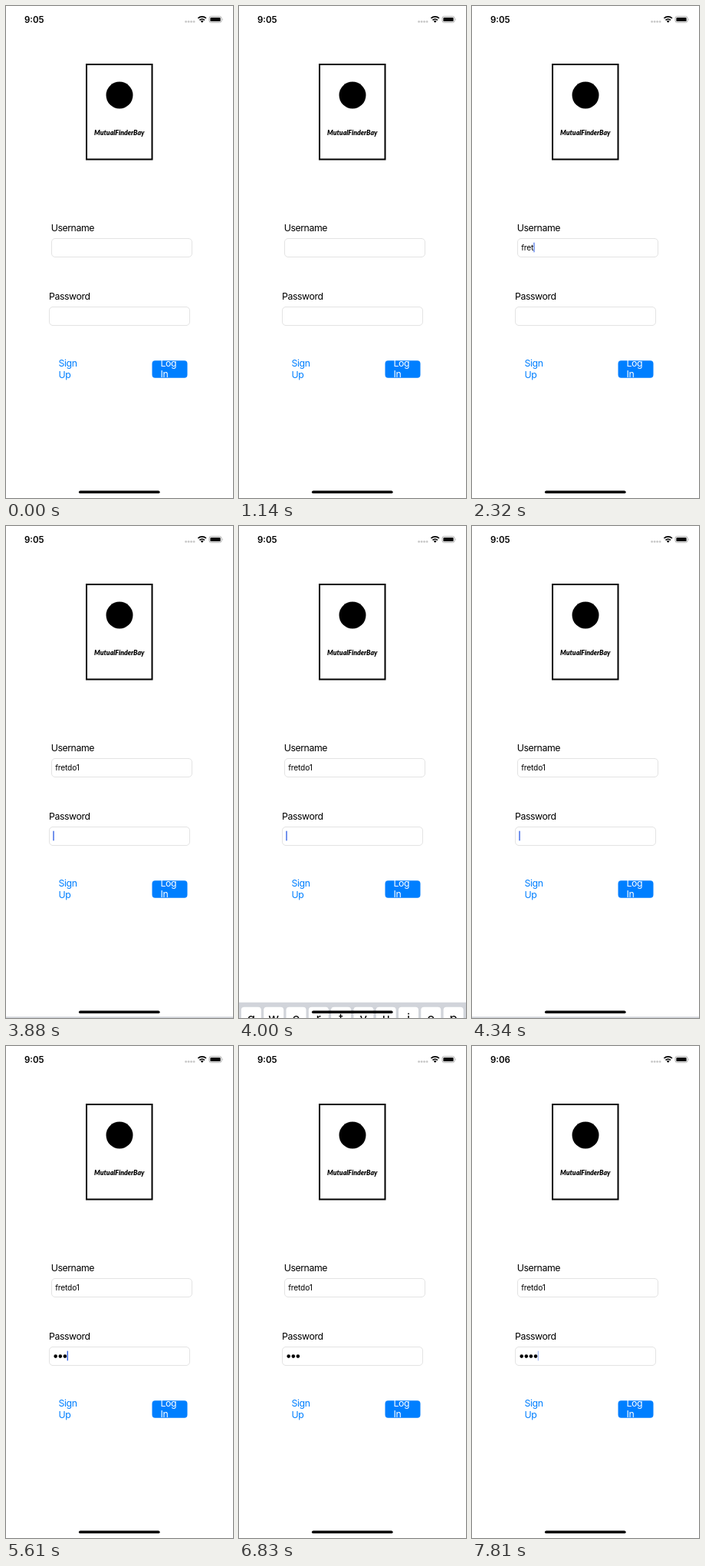
An HTML page that plays this animation: 296 by 640 pixels, repeating every 8000 ms.

```html
<!DOCTYPE html>
<html lang="en">
<head>
<meta charset="utf-8">
<title>Log in</title>
<style>
  html, body { margin: 0; width: 100%; height: 100%; overflow: hidden; background: #fff; }
  svg { display: block; width: 296px; height: 640px; font-family: Inter, Roboto, sans-serif; }
  .label { font-size: 12.3px; letter-spacing: -.43px; }
  .entry { font-size: 10.2px; letter-spacing: -.2px; }
  .clock { font-size: 11.5px; font-weight: 600; }
  .brand { font: italic 900 8.7px Lato, sans-serif; text-anchor: middle; }
  .field { fill: #fff; stroke: #e3e3e3; }
  .key { font-size: 17px; text-anchor: middle; }
  .blue { fill: #007fff; }
</style>
</head>
<body>
<svg viewBox="0 0 296 640">
  <rect width="296" height="640" fill="#fff"/>

  <text id="clock" class="clock" x="24" y="21.8">9:05</text>
  <g id="signal" fill="#c9c9c9"></g>
  <g fill="none" stroke="#000" stroke-width="1.7">
    <path d="M250.4 16a7.6 7.6 0 0 1 10.6 0"/>
    <path d="M252.5 18.3a4.6 4.6 0 0 1 6.4 0"/>
  </g>
  <path d="M255.7 21.8l-1.9-2a2.7 2.7 0 0 1 3.8 0z"/>
  <rect x="265" y="13.5" width="16" height="8" rx="2.4" fill="none" stroke="#a8a8a8" stroke-width=".9"/>
  <rect x="266.4" y="14.9" width="13.2" height="5.2" rx="1.2"/>
  <path d="M282.4 16.1q1.3 1.4 0 2.8z" fill="#a8a8a8"/>

  <rect x="105" y="76" width="85.5" height="123.5" fill="#fff" stroke="#000" stroke-width="2"/>
  <circle cx="148" cy="116" r="17.5"/>
  <text class="brand" x="147.8" y="167.5">MutualFinderBay</text>

  <text class="label" x="58.7" y="293.2">Username</text>
  <rect class="field" x="59.5" y="302.5" width="183" height="24" rx="4.5"/>
  <text id="user" class="entry" x="64.3" y="318"></text>

  <text class="label" x="56.1" y="382.4">Password</text>
  <rect class="field" x="56.5" y="391.5" width="183" height="24" rx="4.5"/>
  <g id="dots"></g>

  <rect id="caret" width="1.4" height="12.6" fill="#3a66e6"/>

  <text class="label blue" x="68.6" y="469.3">Sign</text>
  <text class="label blue" x="68.6" y="483.7">Up</text>
  <rect class="blue" x="190.5" y="461.3" width="46" height="22.4" rx="4"/>
  <g class="label" fill="#fff">
    <text x="201.6" y="469.3">Log</text>
    <text x="201.6" y="483.4">In</text>
  </g>

  <g id="keyboard"></g>
  <rect x="95" y="630.4" width="105.6" height="3.7" rx="1.85"/>
</svg>
<script>
  const LOOP = 8000, SWITCH = 3880, STEP = 115;
  const $ = id => document.getElementById(id);

  // [start time, value]: each value holds until the next start
  const typed = [[0, ''], [1450, 'f'], [1700, 'fre'], [1810, 'fret'], [2680, 'fretdo'], [3060, 'fretdo1']];
  const dotCount = [[0, 0], [4960, 1], [5270, 2], [5610, 3], [7300, 4]];
  const caretAlpha = [
    [0, 0], [500, 1], [1140, 0], [1450, 1], [2320, .8], [2440, 0], [2680, 1], [3690, 0],
    [3880, 1], [4455, .5], [4570, 0], [4850, .6], [4960, 1],
    [6230, 0], [6470, .5], [6590, 1], [6830, 0], [7300, 1], [7690, .75], [7810, .4]
  ];
  const clockText = [[0, '9:05'], [7410, '9:06']];

  const at = (track, t) => track.filter(([start]) => start <= t).pop()[1];

  function add(parent, tag, attrs, text = '') {
    const node = document.createElementNS('http://www.w3.org/2000/svg', tag);
    for (const name in attrs) node.setAttribute(name, attrs[name]);
    node.textContent = text;
    parent.append(node);
    return node;
  }

  for (let i = 0; i < 4; i++) add($('signal'), 'circle', { cx: 234.6 + i * 3.5, cy: 20.4, r: 1.4 });

  const dots = [0, 1, 2, 3].map(i =>
    add($('dots'), 'circle', { cx: 64.7 + i * 6.1, cy: 403.6, r: 2.3 }));

  add($('keyboard'), 'rect', { width: 296, height: 60, fill: '#d1d4da' });
  [...'qwertyuiop'].forEach((letter, i) => {
    const x = 15.9 + i * 29.3;
    add($('keyboard'), 'rect', { x: x - 13, y: 6, width: 26, height: 32, rx: 3.8, fill: '#fff' });
    add($('keyboard'), 'text', { x, y: 27, class: 'key' }, letter);
  });

  // The keyboard peeks up 33px and drops again, in coarse steps
  function keyboardRise(t) {
    const stepped = SWITCH + Math.floor((t - SWITCH) / STEP) * STEP;
    const phase = (stepped - SWITCH - 2 * STEP) / 270;
    return t < SWITCH || Math.abs(phase) >= 1 ? 0 : 33 * Math.cos(phase * Math.PI / 2) ** 2;
  }

  function draw(t) {
    const user = $('user'), caret = $('caret');
    const count = at(dotCount, t);
    const inUser = t < SWITCH;

    user.textContent = at(typed, t);
    $('clock').textContent = at(clockText, t);
    dots.forEach((dot, i) => dot.setAttribute('opacity', i < count ? 1 : 0));

    const width = user.textContent ? user.getComputedTextLength() : 0;
    caret.setAttribute('x', inUser ? 64.3 + width : 61.3 + count * 6.1);
    caret.setAttribute('y', inUser ? 307.7 : 396.7);
    caret.setAttribute('opacity', at(caretAlpha, t));

    $('keyboard').setAttribute('transform', `translate(0 ${640 - keyboardRise(t)})`);
  }

  const begin = performance.now();
  function tick() {
    draw((performance.now() - begin) % LOOP);
    requestAnimationFrame(tick);
  }
  tick();
</script>
</body>
</html>
```
